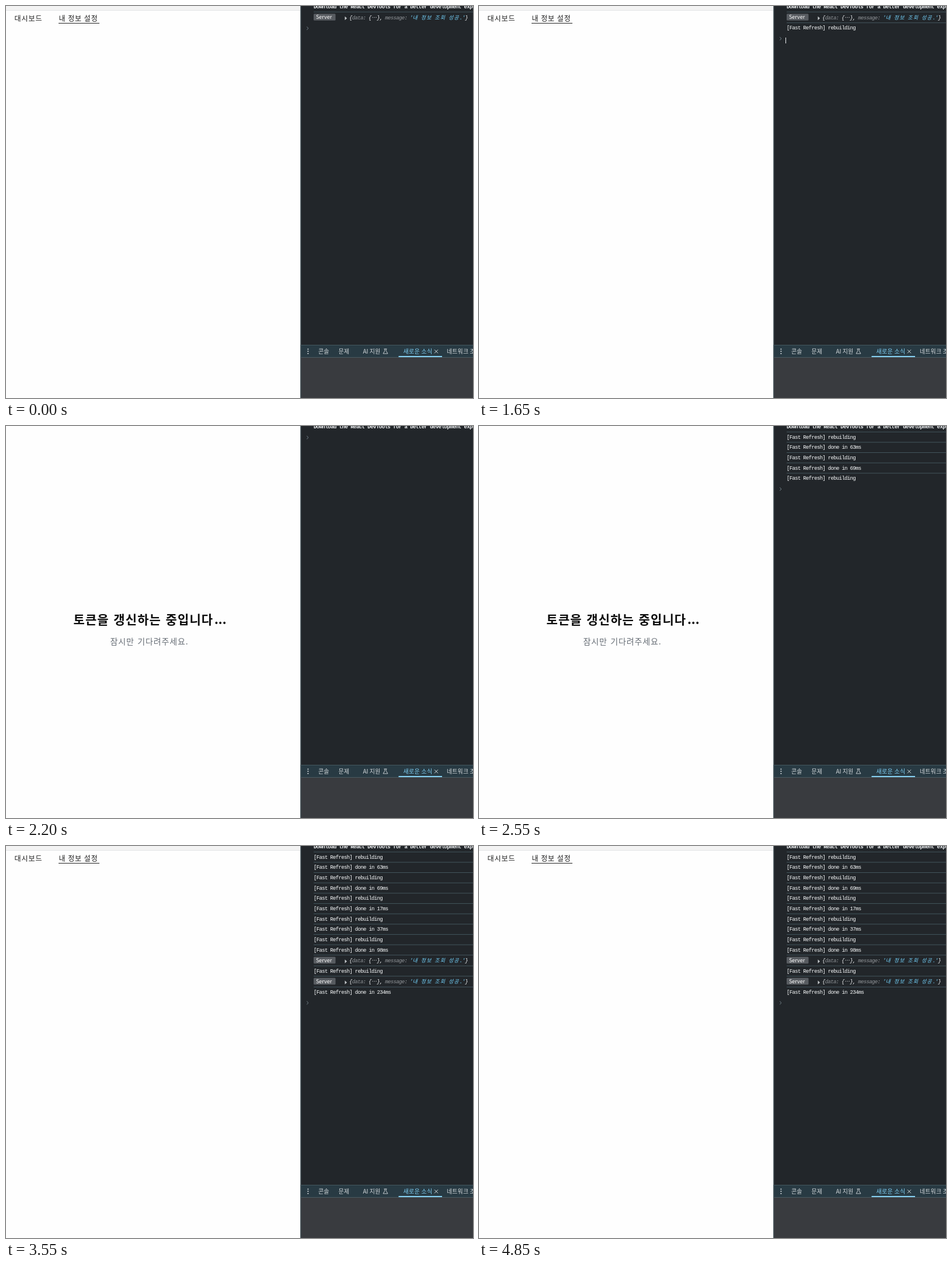
Write an HTML page with a canvas that moves like this. It is 800x671 px and loops after 4.9 s.

```html
<!DOCTYPE html>
<html lang="ko">
<head>
<meta charset="utf-8">
<style>
  html, body { margin: 0; width: 100%; height: 100%; overflow: hidden; background: #fefefe; }
  canvas { display: block; }
</style>
</head>
<body>
<canvas id="stage" width="800" height="671"></canvas>
<script>
const ctx = document.getElementById('stage').getContext('2d');
const SANS = '"Noto Sans CJK KR", "Noto Sans CJK JP", "Noto Sans CJK", sans-serif';
const MONO = '"Liberation Mono", "Noto Sans Mono CJK KR", "Noto Sans CJK KR", monospace';
const LOOP = 4900, CELL = 4.72, ROW = 17.65, SERVER_ROW = 18.5;
const REFRESH_START = 2100, REFRESH_END = 3000;
const SERVER = 'server', REBUILD = 'rebuilding';

// Console entries: [time of appearance, message]
const firstLog = [
  [0, SERVER], [1550, REBUILD], [1750, 'done in 163ms'], [1800, REBUILD], [1850, 'done in 9ms'],
  [1850, REBUILD], [1900, 'done in 33ms'], [1950, REBUILD],
];
const secondLog = [
  [2350, REBUILD], [2400, 'done in 63ms'], [2450, REBUILD], [2550, 'done in 69ms'],
  [2550, REBUILD], [2600, 'done in 17ms'], [2600, REBUILD], [2650, 'done in 37ms'],
  [2650, REBUILD], [2750, 'done in 98ms'], [2800, SERVER], [2800, REBUILD],
  [2850, SERVER], [3050, 'done in 234ms'],
];

function rect(x, y, w, h, color) {
  ctx.fillStyle = color;
  ctx.fillRect(x, y, w, h);
}

function label(text, x, y, size, color, { weight = 400, spacing = 0, word = 0 } = {}) {
  ctx.font = `${weight} ${size}px ${SANS}`;
  ctx.textBaseline = 'middle';
  ctx.letterSpacing = spacing + 'px';
  ctx.wordSpacing = word + 'px';
  ctx.fillStyle = color;
  ctx.fillText(text, x, y);
  ctx.letterSpacing = ctx.wordSpacing = '0px';
}

// Fixed-pitch text; wide characters take two cells. Returns the end position.
function mono(text, x, y, color, style = '500', cell = CELL) {
  ctx.font = `${style} 9px ${MONO}`;
  ctx.textBaseline = 'alphabetic';
  ctx.fillStyle = color;
  for (const ch of text) {
    ctx.fillText(ch, x, y);
    x += ch > '\u2000' ? cell * 2 : cell;
  }
  return x;
}

function stroke(color, width, ...lines) {
  ctx.strokeStyle = color;
  ctx.lineWidth = width;
  ctx.beginPath();
  for (const [start, ...rest] of lines) {
    ctx.moveTo(...start);
    rest.forEach(p => ctx.lineTo(...p));
  }
  ctx.stroke();
}

function drawDashboard() {
  rect(0, 0, 504, 7, '#f3f3f3');
  rect(0, 7, 504, 1, '#e3e4e6');
  label('대시보드', 14.5, 21, 12, '#1c1c1c', { spacing: 0.95 });
  label('내 정보 설정', 90.5, 21, 12, '#1c1c1c', { spacing: 0.95 });
  rect(90, 29, 70, 1, '#222');
}

function drawRefreshing() {
  label('토큰을 갱신하는 중입니다', 115.5, 331, 21, '#0a0a0a', { weight: 700, spacing: 1.1, word: 1.7 });
  label('...', 357, 331, 21, '#0a0a0a', { weight: 700 });
  label('잠시만 기다려주세요.', 178.5, 368.5, 14, '#666d75', { spacing: 0.85, word: 1.6 });
}

function drawServerRow(y) {
  ctx.fillStyle = '#585c61';
  ctx.beginPath();
  ctx.roundRect(527, y + 3, 37.5, 11.5, 1.5);
  ctx.fill();
  label('Server', 531, y + 8.5, 9, '#fff', { weight: 500 });
  ctx.fillStyle = '#c3c7ca';
  ctx.beginPath();
  ctx.moveTo(580.5, y + 7.5);
  ctx.lineTo(584, y + 10.8);
  ctx.lineTo(580.5, y + 14);
  ctx.fill();
  const parts = [
    ['{', '#f0f2f4'], ['data', '#909498'], [': ', '#a8acb0'], ['{⋯}, ', '#f0f2f4'],
    ['message', '#909498'], [': ', '#a8acb0'], ["'내 정보 조회 성공.'", '#74d2fb'], ['}', '#f0f2f4'],
  ];
  parts.reduce((x, [text, color]) => mono(text, x, y + 12.4, color, 'italic 500'), 588);
}

function drawConsole(t) {
  rect(504.5, 0, 295.5, 671, '#22262a');
  mono('Download the React DevTools for a better development experience', 527, 3.8, '#f4f6f8', 'bold', 4.86);
  let y = 10.2;
  for (const [time, message] of t < REFRESH_START ? firstLog : secondLog) {
    if (t < time) break;
    rect(527, y - 0.5, 273, 1, '#42555c');
    if (message === SERVER) drawServerRow(y);
    else mono('[Fast Refresh] ' + message, 527, y + 11.5, '#fafcfd');
    y += message === SERVER ? SERVER_ROW : ROW;
  }
  stroke('#74828a', 1, [[515.2, y + 6.8], [518, y + 9.5], [515.2, y + 12.2]]);
  const caretOn = Math.floor((t - 250) / 600) % 2 === 0;
  if (caretOn) rect(525, Math.round(y + 7.2), 1, 10, '#f0f2f4');
}

function drawDrawer() {
  rect(504.5, 580, 295.5, 21, '#283a43');
  rect(504.5, 580, 295.5, 1, '#45585f');
  rect(504.5, 601, 295.5, 70, '#393b3f');
  rect(504.5, 601, 295.5, 1, '#4a5a61');
  for (const y of [586.5, 590.2, 594]) rect(516.5, y, 1.8, 1.8, '#d5dadd');
  const tab = '#d3d9dc', active = '#7fcff5';
  label('콘솔', 535, 591, 10, tab, { spacing: 0.1 });
  label('문제', 569.5, 591, 10, tab, { spacing: 0.1 });
  label('AI 지원', 611.5, 591, 10, tab);
  label('새로운 소식', 680.5, 591, 10, active, { spacing: 0.3 });
  label('네트워크 조건', 755, 591, 10, tab, { spacing: 0.1 });
  stroke(tab, 0.9, [[647.5, 587], [652.5, 587]],
    [[648.8, 587], [648.8, 590.5], [646, 595], [654, 595], [651.2, 590.5], [651.2, 587]]);
  stroke(tab, 1, [[734, 588.3], [740, 594.3]], [[740, 588.3], [734, 594.3]]);
  rect(672.5, 599, 74.5, 2, '#86d0f2');
  rect(504.5, 0, 1, 671, '#465860');
}

function frame(now) {
  const t = now % LOOP;
  rect(0, 0, 800, 671, '#fefefe');
  if (t >= REFRESH_START && t < REFRESH_END) drawRefreshing();
  else drawDashboard();
  drawConsole(t);
  drawDrawer();
  requestAnimationFrame(frame);
}
requestAnimationFrame(frame);
</script>
</body>
</html>
```
